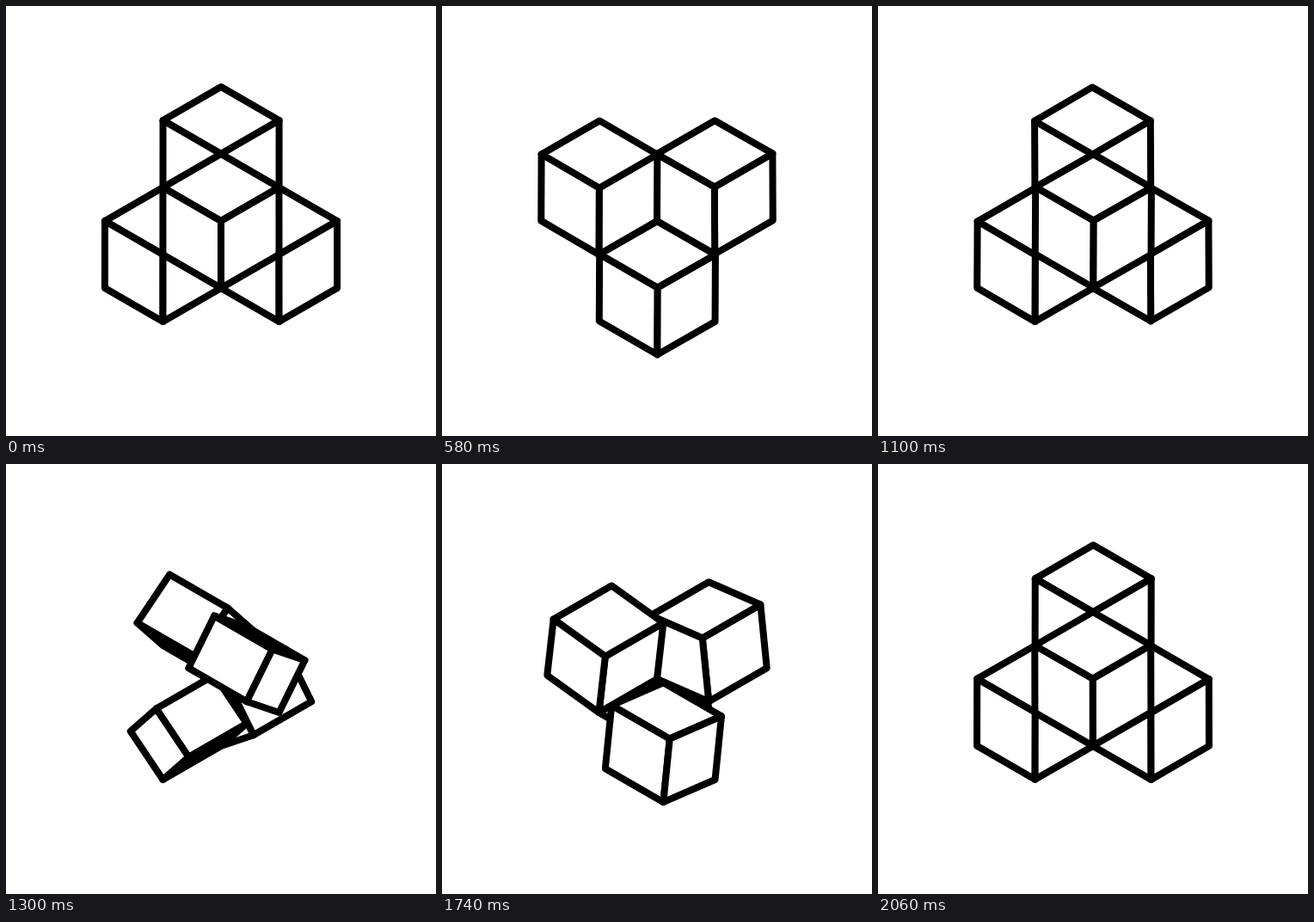
An HTML page with a canvas that plays this animation: 500x500 px, repeating every 2080 ms.

```html
<!DOCTYPE html>
<html>
<head>
<meta charset="utf-8">
<style>
html, body { margin: 0; width: 100%; height: 100%; overflow: hidden; background: #fff; }
canvas { display: block; }
</style>
</head>
<body>
<canvas id="stage" width="500" height="500"></canvas>
<script>
const ctx = document.getElementById('stage').getContext('2d');
const STEP = 20, STEPS = 104, TURN = 26, EDGE = 78;
const W = EDGE * Math.sqrt(3) / 2;

const ease = p => 0.5 + 0.5 * Math.tanh(6 * (p - 0.5)) / Math.tanh(3);
const project = ([x, y, z]) => [250 + W * (x - y), 250 + EDGE * ((x + y) / 2 - z)];
const depth = points => points.reduce((sum, [x, y, z]) => sum + x + y + z, 0);

// A cube rolls a quarter turn over its inner bottom edge; every corner moves on a straight line.
function corners(alongX, side, base, t) {
  const start = alongX ? side : -side;
  return Array.from({ length: 8 }, (_, i) => {
    const u = i & 1, w = i >> 1 & 1, v = i >> 2;
    const across = start * (u - (u + w) * t);
    const z = base + w + (u - w) * t;
    return alongX ? [side * v, across, z] : [across, side * v, z];
  });
}

function drawCube(points) {
  const middle = depth(points) / 2;
  for (const bit of [1, 2, 4]) {
    const [a, b] = [1, 2, 4].filter(other => other !== bit);
    for (const from of [0, bit]) {
      const face = [from, from + a, from + a + b, from + b].map(i => points[i]);
      if (depth(face) <= middle + 1e-6) continue;
      ctx.beginPath();
      face.forEach(point => ctx.lineTo(...project(point)));
      ctx.closePath();
      ctx.fill();
      ctx.stroke();
    }
  }
}

function frame() {
  const step = Math.floor(performance.now() / STEP) % STEPS;
  const phase = (step - 0.5 + STEPS) % STEPS / TURN;
  const turn = Math.floor(phase), t = ease(phase - turn);
  const even = turn % 2 === 0;

  ctx.fillStyle = '#fff';
  ctx.strokeStyle = '#000';
  ctx.lineWidth = 8;
  ctx.lineJoin = 'round';
  ctx.fillRect(0, 0, 500, 500);
  // Lower layer first, and the far cube before the near one.
  for (const base of [-1, 0]) {
    for (const side of [-1, 1]) drawCube(corners(even === (base === 0), side, base, t));
  }
  requestAnimationFrame(frame);
}
frame();
</script>
</body>
</html>
```
